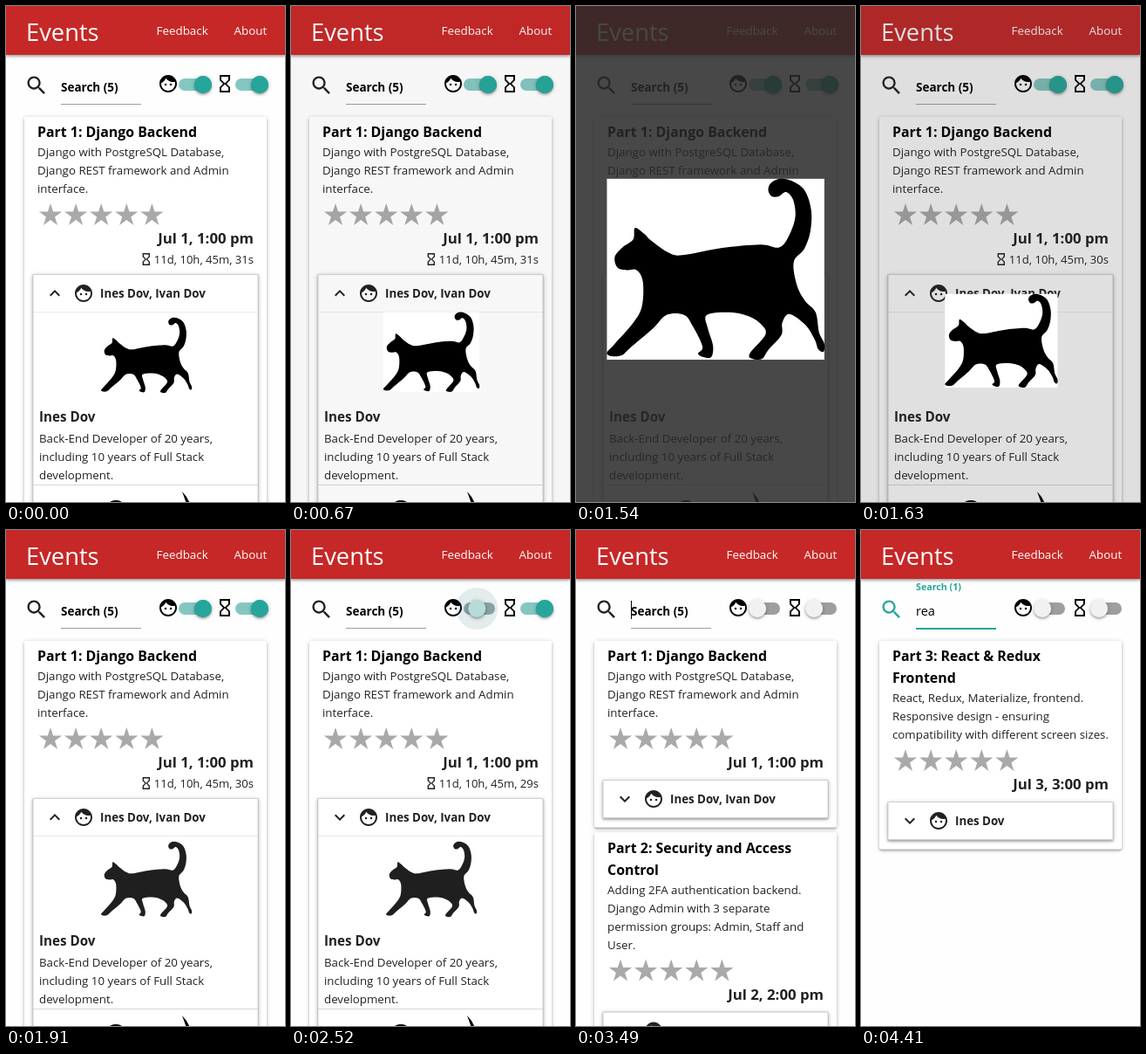
These frames come from a looping animation (320 px wide and 568 px high, 4870 ms). An HTML page with a canvas:

```html
<!DOCTYPE html>
<html lang="en">
<head>
<meta charset="utf-8">
<title>Events</title>
<style>
  html, body { margin: 0; width: 100%; height: 100%; overflow: hidden; background: #fff; }
  canvas { display: block; }
</style>
</head>
<body>
<canvas id="stage" width="320" height="568"></canvas>
<script>
const ctx = document.getElementById('stage').getContext('2d');
const LOOP = 4870;
const INK = '#212121', TEAL = [38, 166, 154];
const rgb = c => `rgb(${c.map(Math.round)})`;

const ICONS = {
  search: 'M15.5 14h-.79l-.28-.27C15.41 12.59 16 11.11 16 9.5 16 5.91 13.09 3 9.5 3S3 5.91 3 9.5 5.91 16 9.5 16c1.61 0 3.09-.59 4.23-1.57l.27.28v.79l5 4.99L20.49 19l-4.99-5zm-6 0C7.01 14 5 11.99 5 9.5S7.01 5 9.5 5 14 7.01 14 9.5 11.99 14 9.5 14z',
  face: 'M9 11.75a1.25 1.25 0 1 0 0 2.5 1.25 1.25 0 1 0 0-2.5zm6 0a1.25 1.25 0 1 0 0 2.5 1.25 1.25 0 1 0 0-2.5zM12 2C6.48 2 2 6.48 2 12s4.48 10 10 10 10-4.48 10-10S17.52 2 12 2zm0 18c-4.41 0-8-3.59-8-8 0-.29.02-.58.05-.86 2.36-1.05 4.23-2.98 5.21-5.37C11.07 8.33 14.05 10 17.42 10c.78 0 1.53-.09 2.25-.26.21.71.33 1.47.33 2.26 0 4.41-3.59 8-8 8z',
  hourglass: 'M6 2v6l4 4-4 4v6h12v-6l-4-4 4-4V2H6zm10 14.5V20H8v-3.5l4-4 4 4zm-4-5l-4-4V4h8v3.5l-4 4z',
  more: 'M16.59 8.59L12 13.17 7.41 8.59 6 10l6 6 6-6z',
  less: 'M12 8l-6 6 1.41 1.41L12 10.83l4.59 4.58L18 14z'
};
for (const name in ICONS) ICONS[name] = new Path2D(ICONS[name]);

// Cat outline inside a 248 x 206 box.
const CAT_W = 248, CAT_H = 206;
const CAT = smoothPath([
  32,56, 30,69, 18,78, 9,89, 12,101, 23,104, 34,104, 41,117, 40,145, 30,164, 8,189,
  0,198, 5,202, 17,201, 26,193, 52,171, 68,155, 88,155, 98,168, 109,191, 104,199,
  110,203, 119,203, 121,190, 115,170, 114,155, 140,152, 160,156, 174,164, 181,177,
  163,199, 166,205, 177,205, 184,195, 199,178, 200,164, 208,154, 226,166, 237,183,
  241,194, 247,197, 248,188, 242,175, 238,152, 226,139, 217,122, 213,95, 225,80,
  232,60, 233,36, 226,14, 212,3, 198,0, 187,5, 184,13, 188,20, 196,20, 204,15,
  212,23, 215,42, 209,62, 197,78, 175,75, 130,79, 86,87, 70,84, 50,70, 43,63
]);

const CARDS = [
  { title: ['Part 1: Django Backend'],
    text: ['Django with PostgreSQL Database,', 'Django REST framework and Admin', 'interface.'],
    date: 'Jul 1, 1:00 pm', speakers: 'Ines Dov, Ivan Dov' },
  { title: ['Part 2: Security and Access', 'Control'],
    text: ['Adding 2FA authentication backend.', 'Django Admin with 3 separate', 'permission groups: Admin, Staff and', 'User.'],
    date: 'Jul 2, 2:00 pm', speakers: 'Ines Dov' },
  { title: ['Part 3: React & Redux', 'Frontend'],
    text: ['React, Redux, Materialize, frontend.', 'Responsive design - ensuring', 'compatibility with different screen sizes.'],
    date: 'Jul 3, 3:00 pm', speakers: 'Ines Dov' }
];
const BIO = ['Back-End Developer of 20 years,', 'including 10 years of Full Stack', 'development.'];

const progress = (t, start, length) => Math.min(1, Math.max(0, (t - start) / length));
const easeOut = x => 1 - (1 - x) ** 2;
const easeInOut = x => x < .5 ? 4 * x ** 3 : 1 - (2 - 2 * x) ** 3 / 2;
const lerp = (a, b, k) => a + (b - a) * k;
const mix = (a, b, k) => rgb(a.map((v, i) => lerp(v, b[i], k)));

function smoothPath(list) {
  const n = list.length / 2, path = new Path2D();
  const at = i => [list[(i + n) % n * 2], list[(i + n) % n * 2 + 1]];
  path.moveTo(...at(0));
  for (let i = 0; i < n; i++) {
    const [a, b, c, d] = [at(i - 1), at(i), at(i + 1), at(i + 2)];
    path.bezierCurveTo(b[0] + (c[0] - a[0]) / 6, b[1] + (c[1] - a[1]) / 6,
      c[0] - (d[0] - b[0]) / 6, c[1] - (d[1] - b[1]) / 6, ...c);
  }
  return path;
}

function text(str, x, y, size, { color = INK, bold = false, align = 'left' } = {}) {
  ctx.font = `${bold ? 700 : 400} ${size}px "Open Sans", "Noto Sans", sans-serif`;
  ctx.fillStyle = color;
  ctx.textAlign = align;
  ctx.fillText(str, x, y);
  return ctx.measureText(str).width;
}

function icon(name, x, y, size = 24, color = INK) {
  ctx.save();
  ctx.translate(x, y);
  ctx.scale(size / 24, size / 24);
  ctx.fillStyle = color;
  ctx.fill(ICONS[name], 'evenodd');
  ctx.restore();
}

function rect(x, y, w, h, color) {
  ctx.fillStyle = color;
  ctx.fillRect(x, y, w, h);
}

function raised(color, trace) {
  ctx.save();
  ctx.fillStyle = color;
  for (const [dy, blur, alpha] of [[1, 5, .24], [2, 2, .2]]) {
    ctx.shadowColor = `rgba(0,0,0,${alpha})`;
    ctx.shadowOffsetY = dy;
    ctx.shadowBlur = blur;
    ctx.beginPath();
    trace();
    ctx.fill();
  }
  ctx.restore();
}
const panel = (x, y, w, h, r, color = '#fff') => raised(color, () => ctx.roundRect(x, y, w, h, r));

function disc(x, y, r, color) {
  ctx.fillStyle = color;
  ctx.beginPath();
  ctx.arc(x, y, r, 0, 7);
  ctx.fill();
}

function star(cx, cy) {
  ctx.beginPath();
  for (let i = 0; i < 10; i++) {
    const a = i * Math.PI / 5, r = i % 2 ? 5.3 : 13.8;
    ctx.lineTo(cx + r * Math.sin(a), cy - r * Math.cos(a));
  }
  ctx.fillStyle = '#a9a9a9';
  ctx.fill();
}

function cat(cx, cy, width, alpha = 1) {
  const k = width / CAT_W;
  ctx.save();
  ctx.globalAlpha = alpha;
  ctx.translate(cx, cy);
  ctx.scale(k, k);
  ctx.translate(-CAT_W / 2, -CAT_H / 2);
  ctx.fillStyle = '#000';
  ctx.fill(CAT);
  ctx.restore();
}

function toggle(x, t, start, rippleFade) {
  const off = easeOut(progress(t, start, 220)), knobX = x + 28 - 18 * off;
  ctx.fillStyle = mix([132, 199, 193], [158, 158, 158], off);
  ctx.beginPath();
  ctx.roundRect(x, 83, 36, 14, 7);
  ctx.fill();
  const grow = easeOut(progress(t, start, 100));
  const fade = 1 - progress(t, rippleFade, 200);
  if (grow && fade) disc(knobX, 90, 10 + 14 * grow, `rgba(38,110,104,${.12 * fade})`);
  raised(mix(TEAL, [241, 241, 241], off), () => ctx.arc(knobX, 90, 10, 0, 7));
}

function speakerList(top, s) {
  rect(31, top, 258, 1, '#d6d6d6');
  if (s.thumb) cat(161, top + 50, 104, s.thumb);
  text('Ines Dov', 38, top + 126, 15.2, { bold: true });
  BIO.forEach((line, i) => text(line, 38, top + 150 + 21 * i, 13.3));

  // The second portrait barely peeks in at the bottom edge.
  const next = top + 198;
  rect(31, next, 258, 1, '#d6d6d6');
  ctx.fillStyle = '#000';
  ctx.beginPath();
  ctx.moveTo(202, next + 8);
  ctx.quadraticCurveTo(208, next + 14, 211, next + 22);
  ctx.lineTo(207, next + 22);
  ctx.fill();
  ctx.beginPath();
  ctx.ellipse(126, next + 22, 8, 4, 0, 0, 7);
  ctx.fill();
  text('Ivan Dov', 38, next + 126, 15.2, { bold: true });
}

function card(top, { title, text: lines, date, speakers }, s, first) {
  const body = 396 * s.open;
  const titleEnd = top + 23 + 25 * (title.length - 1);
  const textEnd = titleEnd + 22 + 21 * (lines.length - 1);
  const dateY = textEnd + 58;
  const box = dateY + 14.5 + (s.countdown ? 21 : 0);
  const bottom = box + 43 + body + 11;

  panel(21, top, 278, bottom - top, 2);
  title.forEach((line, i) => text(line, 36, top + 23 + 25 * i, 15.9, { bold: true, color: '#000' }));
  lines.forEach((line, i) => text(line, 36, titleEnd + 22 + 21 * i, 13.3));
  for (let i = 0; i < 5; i++) star(51 + 29.1 * i, textEnd + 25.8);
  text(date, 284, dateY, 16.8, { bold: true, align: 'right' });
  if (s.countdown) {
    const w = text(`11d, 10h, 45m, ${s.seconds}s`, 284, dateY + 23, 13.1, { align: 'right' });
    icon('hourglass', 284 - w - 17.4, dateY + 9.6, 16.8);
  }

  panel(30.5, box - .5, 259, 44 + body, 1, '#d0d0d0');
  rect(31.5, box + .5, 257, 42 + body, '#fff');
  icon(s.expanded ? 'less' : 'more', 44, box + 9.5);
  icon('face', 77, box + 9.5);
  text(speakers, 108, box + 26, 13.3, { bold: true });
  if (body && first) {
    ctx.save();
    ctx.beginPath();
    ctx.rect(31, box + 43, 258, body);
    ctx.clip();
    speakerList(Math.round(box + 42.5), s);
    ctx.restore();
  }
  return bottom;
}

function toolbar(t) {
  const focused = t >= 3490, active = t >= 3540;
  const lift = easeOut(progress(t, 3530, 200));
  const accent = active ? rgb(TEAL) : INK;
  icon('search', 21, 77, 28, accent);
  text(`Search (${t >= 3860 ? 1 : 5})`, 63, lerp(98, 69, lift), lerp(13.5, 10.7, lift),
    { bold: true, color: mix([0, 0, 0], TEAL, lift) });
  rect(63, 112, 92, active ? 2 : 1, active ? accent : '#9e9e9e');

  const typed = 'rea'.slice(0, Math.max(0, Math.floor((t - 3540) / 100)));
  const width = text(typed, 63, 98, 14.6, { color: '#000' });
  if (focused && t < 4410) rect(63 + Math.round(width), 81, 1, 21, '#000');

  icon('face', 174, 77, 24, '#000');
  toggle(198, t, 2420, 2560);
  icon('hourglass', 239, 77, 24, '#000');
  toggle(263, t, 2800, 2960);
}

function header() {
  panel(0, 0, 320, 56, 0, '#c62828');
  const white = { color: '#fff' };
  text('Events', 23, 40, 27.3, white);
  text('Feedback', 172.5, 33, 13.4, white);
  text('About', 261.5, 33, 13.4, white);
}

function lightbox(zoom) {
  ctx.globalAlpha = zoom;
  rect(0, 0, 320, 568, '#292929');
  ctx.globalAlpha = 1;
  const w = lerp(104, 275, zoom), h = w * CAT_H / CAT_W;
  const cx = lerp(161, 160, zoom), cy = lerp(400.5, 284, zoom);
  rect(cx - w / 2, cy - h / 2, w, h, '#fff');
  cat(cx, cy, w);
}

function draw(t) {
  const zoom = t < 1200 ? easeOut(progress(t, 666, 275)) : 1 - easeOut(progress(t, 1528, 167));
  const state = {
    open: 1 - easeInOut(progress(t, 2520, 300)),
    expanded: t < 2470,
    countdown: t < 2930,
    seconds: 31 - Math.max(0, Math.floor((t - 140) / 1000)),
    thumb: zoom > 0 ? 0 : 1 - .12 * progress(t, 1700, 210)
  };

  rect(0, 0, 320, 568, '#fefefe');
  if (t >= 3860) {
    card(127, CARDS[2], state, false);
  } else {
    const bottom = card(127, CARDS[0], state, true);
    if (bottom < 568) card(bottom + 6, CARDS[1], state, false);
  }
  toolbar(t);
  header();
  if (zoom > 0) lightbox(zoom);
}

const began = performance.now();
(function frame() {
  draw((performance.now() - began) % LOOP);
  requestAnimationFrame(frame);
})();
</script>
</body>
</html>
```
